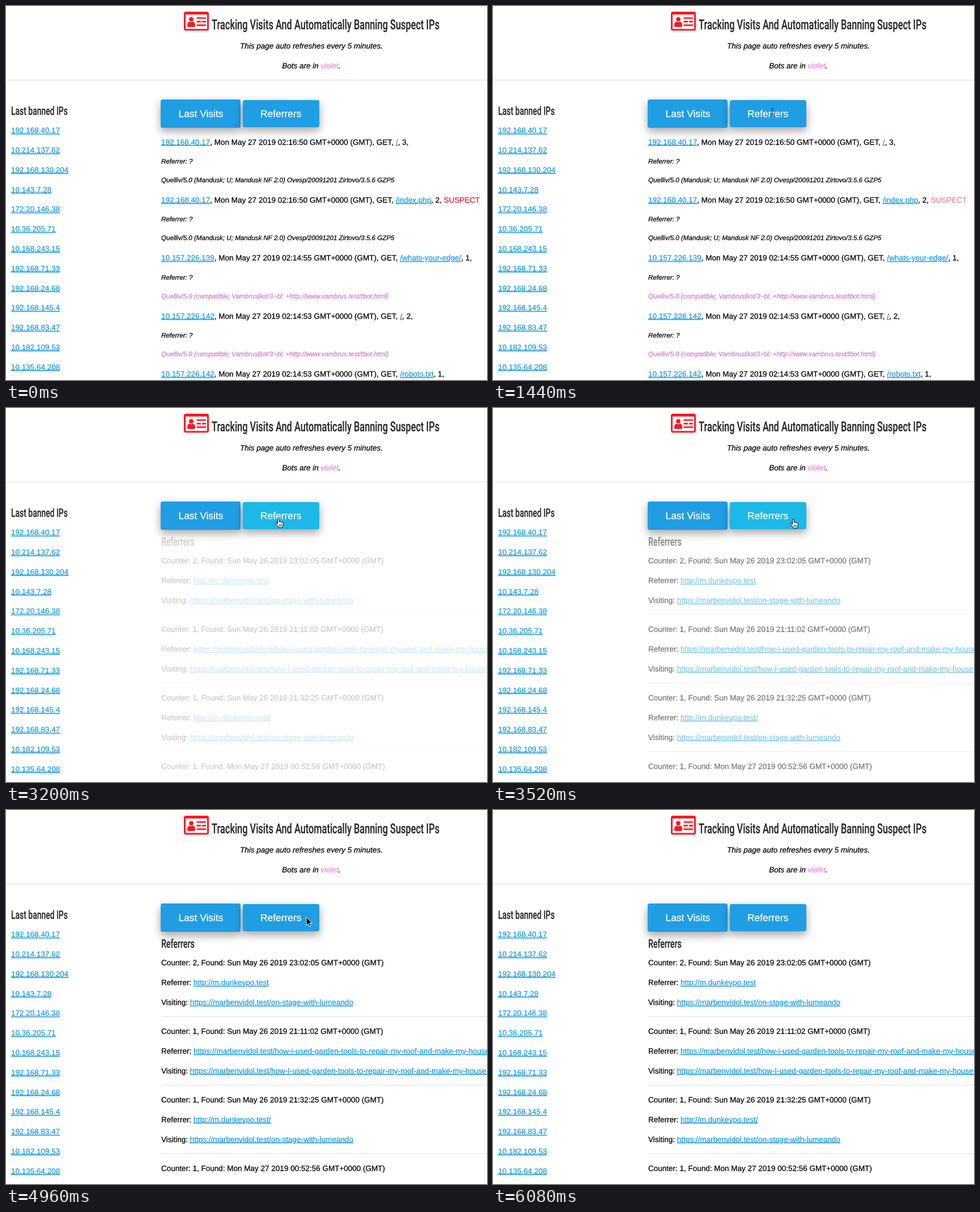
An HTML page that plays this animation: 849 px wide and 660 px high, repeating every 6.72 s.

```html
<!DOCTYPE html>
<html lang="en">
<head>
<meta charset="utf-8">
<title>Visits</title>
<style>
  html, body { margin: 0; width: 100%; height: 100%; overflow: hidden; background: #fff; }
  #stage { position: relative; width: 849px; height: 660px; overflow: hidden; }
  #stage > svg { position: absolute; left: 0; top: 0; }
  .btn {
    position: absolute; border-radius: 3.5px; background: #209ee4;
    box-shadow: 0 7px 14px rgba(0,0,0,.2), 0 5px 18px rgba(0,0,0,.19);
  }
  .btn.over { background: #1cb9e7; }
  text { font: 13.5px "Liberation Sans", Arial, sans-serif; text-rendering: geometricPrecision; }
  /* A hairline stroke gives the heavier look of smoothed text */
  text, tspan { fill: var(--ink, #000); stroke: var(--ink, #000); stroke-width: .25px; }
  .link { --ink: #189ae5; text-decoration: underline; }
  .small { font-size: 11.6px; font-style: italic; }
  .note { font-style: italic; text-anchor: middle; }
  .violet { --ink: #ee82ee; }
  .bot { --ink: #d374da; }
  .head { --ink: #2a2a2a; font-family: Roboto, sans-serif; font-weight: 500; }
  .label { --ink: #fff; font-size: 17.4px; }
  .alert { --ink: #ff1722; }
</style>
</head>
<body>
<div id="stage">
  <div class="btn" style="left:273px;top:165px;width:141px;height:50px"></div>
  <div class="btn" style="left:418px;top:166px;width:134.5px;height:48px"></div>
  <svg width="849" height="660" viewBox="0 0 849 660">
    <g fill="#ff1722">
      <path fill-rule="evenodd" d="M317.5 10h37a3.5 3.5 0 0 1 3.5 3.5v26.5a3.5 3.5 0 0 1-3.5 3.5h-37a3.5 3.5 0 0 1-3.5-3.5v-26.5a3.5 3.5 0 0 1 3.5-3.5zM317 15v25.5h38v-25.5z"/>
      <circle cx="327" cy="23.3" r="3.9"/>
      <path d="M320 35q0-7 4-7.5 3 1.8 6 0 4 .5 4 7.5 0 2-2 2h-10q-2 0-2-2z"/>
      <path d="M336.5 20h16.5v2.6h-16.5zM336.5 26.3h7.5v2.6h-7.5zM346 26.3h7v2.6h-7zM336.5 32.6h16.5v2.6h-16.5z"/>
    </g>
    <path d="M0 130.5H849" stroke="#e8e8e8"/>
    <path d="M0 131.5H849" stroke="#f5f5f5"/>
    <g id="page"></g>
    <g id="visits"></g>
    <g id="referrers"></g>
    <g id="cursor">
      <path id="arrow" fill="#000" stroke="#fff" d="M0 0V14.5L3.4 11.4 5.6 16.6 8 15.6 5.8 10.5H10.5Z"/>
      <path id="hand" fill="#fff" stroke="#000" stroke-linejoin="round" d="M-1.5 9.5V1.3a1.4 1.4 0 0 1 2.8 0V6q1.4-.9 2.6.2 1.4-.6 2.4.5 1.8-.4 2 1.3V11q0 2-1.3 3.6V16H.2V14.8Q-2 13-4.6 9.4-5.3 7.6-4 7.2-2.8 7-1.5 9.5ZM1.3 10.5V13.5M3.4 10.5V13.5M5.5 10.5V13.5"/>
      <path id="beam" fill="none" stroke="#222" d="M-2.5-7Q0-7 0-5.5 0-7 2.5-7M0-5.5V5.5M-2.5 7Q0 7 0 5.5 0 7 2.5 7M-1.5 2H1.5"/>
    </g>
  </svg>
</div>
<script>
const LOOP = 6720, STEP = 160;
const $ = id => document.getElementById(id);
const scheme = s => s + ":/" + "/";
const text = (x, y, body, cls = "") => `<text x="${x}" y="${y}" class="${cls}">${body}</text>`;
const link = s => `<tspan class="link">${s}</tspan>`;
// Condensed heading face
const head = (x, y, size, body) =>
  `<text class="head" style="font-size:${size}px" transform="translate(${x} ${y}) scale(.682 1)">${body}</text>`;

const banned = ["192.168.40.17", "10.214.137.62", "192.168.130.204", "10.143.7.28",
  "172.20.146.38", "10.36.205.71", "10.168.243.15", "192.168.71.33", "192.168.24.68",
  "192.168.145.4", "192.168.83.47", "10.182.109.53", "10.135.64.208"];

$("page").innerHTML =
  head(363, 41, 24, "Tracking Visits And Automatically Banning Suspect IPs") +
  text(539, 75.2, "This page auto refreshes every 5 minutes.", "note") +
  text(539, 110, 'Bots are in <tspan class="violet">violet</tspan>.', "note") +
  head(9, 192, 20.4, "Last banned IPs") +
  text(304.5, 196, "Last Visits", "label") +
  text(449, 196, "Referrers", "label") +
  banned.map((ip, i) => text(9, 224.2 + 34.79 * i, link(ip))).join("");

const browser = "Quelliv/5.0 (Mandusk; U; Mandusk NF 2.0) Ovesp/20091201 Zirtovo/3.5.6 GZP5";
const crawler = `Quelliv/5.0 (compatible; VambrusBot/3~bl; +${scheme("http")}www.vambrus.test/tbot.html)`;
const visits = [
  [banned[0], "16:50", "/", 3],
  [banned[0], "16:50", "/index.php", 2],
  ["10.157.226.139", "14:55", "/whats-your-edge/", 1],
  ["10.157.226.142", "14:53", "/", 2],
  ["10.157.226.142", "14:53", "/robots.txt", 1]
];
$("visits").innerHTML = visits.map(([ip, time, path, count], i) => {
  const y = 244.5 + 102.38 * i, isBot = i > 1;
  const alert = i == 1 ? ' <tspan class="alert" id="alert">SUSPECT</tspan>' : "";
  return text(274, y, `${link(ip)}, Mon May 27 2019 02:${time} GMT+0000 (GMT), GET, ${link(path)}, ${count},${alert}`) +
    text(274, y + 33.5, "Referrer: ?", "small") +
    text(274, y + 66.5, isBot ? crawler : browser, isBot ? "small bot" : "small");
}).join("");

const social = scheme("http") + "m.dunkevpo.test";
const site = scheme("https") + "marbenvidol.test/";
const show = site + "on-stage-with-lumeando";
const essay = i => `${site}how-${i}-used-garden-tools-to-repair-my-roof-and-make-my-house-warm`;
const found = [
  [2, "Sun May 26 2019 23:02:05", social, show],
  [1, "Sun May 26 2019 21:11:02", essay("i"), essay("I")],
  [1, "Sun May 26 2019 21:32:25", social + "/", show],
  [1, "Mon May 27 2019 00:52:56", social, show]
];
$("referrers").innerHTML = head(274, 243, 20.8, "Referrers") +
  found.map(([count, date, from, to], i) => {
    const y = 274.4 + 120.8 * i;
    return text(274, y, `Counter: ${count}, Found: ${date} GMT+0000 (GMT)`) +
      text(274, y + 34.8, "Referrer: " + link(from)) +
      text(274, y + 69.7, "Visiting: " + link(to)) +
      `<path d="M274 ${Math.floor(y + 90)}.5H849" stroke="#e0e0e0"/>`;
  }).join("");

// time, x, y, pointer
const path = [
  [0, 540, 240, ""],
  [1280, 540, 240, "beam"],
  [1440, 493, 188, "beam"],
  [1600, 484, 192, "hand"],
  [2080, 475, 194, "hand"],
  [2720, 475, 194, "hand"],
  [3200, 481, 195, "hand"],
  [3360, 483, 195, "hand"],
  [3520, 530, 196, "hand"],
  [3680, 620, 194, "arrow"],
  [3840, 663, 192, "arrow"],
  [4800, 663, 192, "arrow"],
  [4960, 530, 189, "arrow"],
  [5120, 470, 192, "hand"],
  [5280, 400, 193, "hand"],
  [5440, 352, 194, "hand"],
  [5920, 352, 194, "hand"],
  [6080, 352, 194, ""]
];
const buttons = document.querySelectorAll(".btn");
const clamp = v => Math.min(1, Math.max(0, v));

function pointerAt(t) {
  const i = path.findLastIndex(p => p[0] <= t);
  const [t0, x0, y0, kind] = path[i], [t1, x1, y1] = path[i + 1] || [LOOP, x0, y0];
  const k = (t - t0) / (t1 - t0);
  return { x: x0 + (x1 - x0) * k, y: y0 + (y1 - y0) * k, kind };
}

function blink(t) {
  const u = t % 2000;
  return u < 1000 ? clamp((720 - u) / 440) : clamp((u - 1240) / 400);
}

function draw(t) {
  const { x, y, kind } = pointerAt(t);
  $("cursor").setAttribute("transform", `translate(${x} ${y})`);
  for (const k of ["arrow", "hand", "beam"]) $(k).style.display = k == kind ? "" : "none";
  const over = kind == "hand" ? (x < 416 ? 0 : 1) : -1;
  buttons.forEach((b, i) => b.classList.toggle("over", i == over));
  const alert = $("alert").style;
  alert.fillOpacity = alert.strokeOpacity = blink(t);
  $("visits").style.display = t < 3000 ? "" : "none";
  $("referrers").style.opacity = clamp((t - 2990) / 980);
}

const start = performance.now();
function tick() {
  const t = (performance.now() - start) % LOOP;
  draw(Math.floor(t / STEP) * STEP);
  requestAnimationFrame(tick);
}
tick();
</script>
</body>
</html>
```
